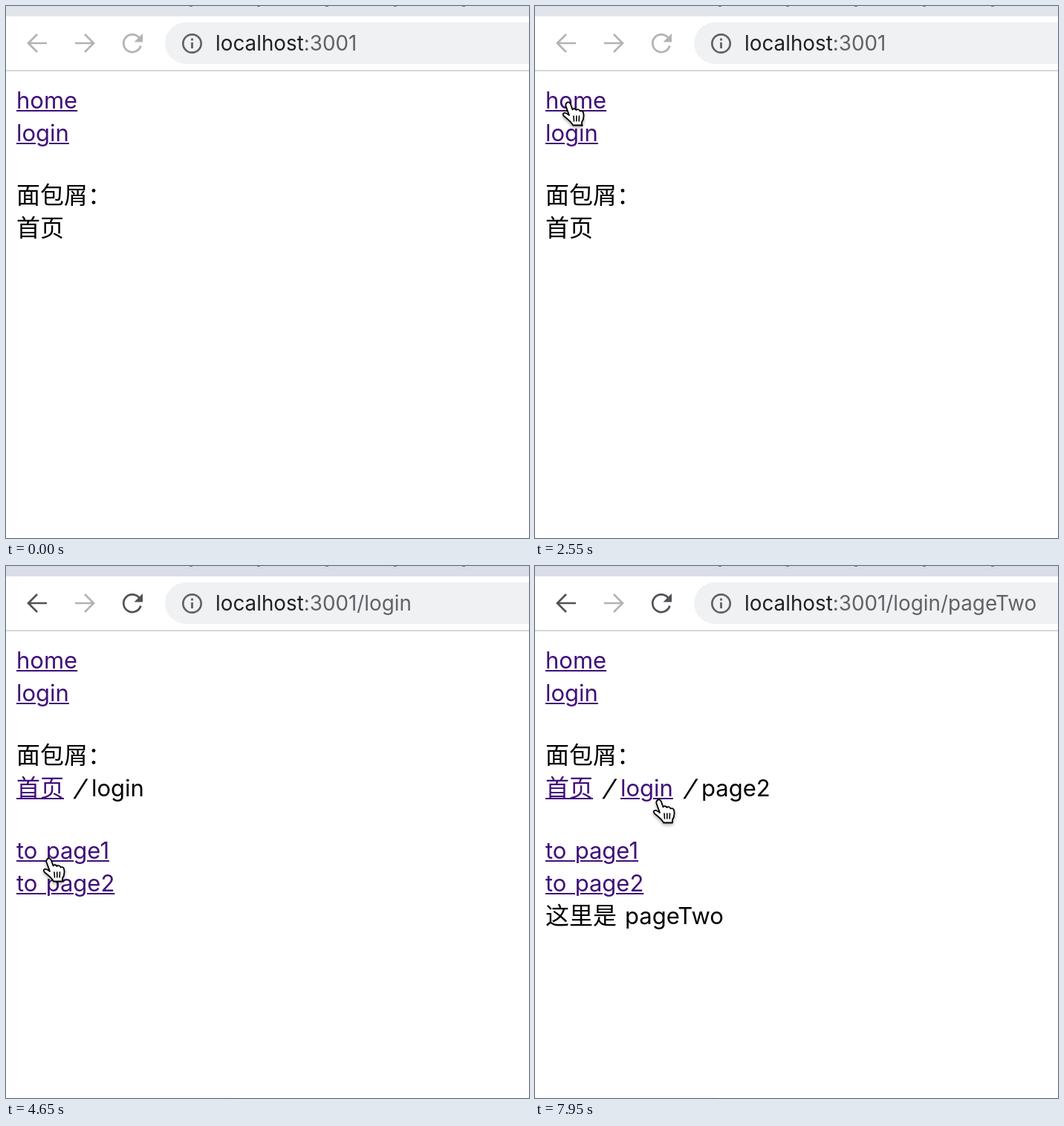
Animation, 704 px wide and 716 px high, one loop 8000 ms. Source, as an HTML page:

```html
<!DOCTYPE html>
<html lang="zh-CN">
<head>
<meta charset="utf-8">
<style>
  html, body { margin: 0; width: 100%; height: 100%; overflow: hidden; background: #fff; }
  body { position: relative; font-family: Inter, "Noto Sans CJK SC", "Noto Sans CJK", sans-serif; }
  svg { position: absolute; left: 0; top: 0; }
  span { position: absolute; white-space: pre; line-height: 44px; font-size: 31px; word-spacing: 2.5px; color: #000; }
  .link { color: #40107a; text-decoration: underline 2px; text-underline-offset: 2px; }
  .cjk { font-size: 32px; font-weight: 500; }
  .url { font-size: 27.8px; color: #5f6368; }
  .host { color: #202124; font-weight: 400; }
  .slash { font-weight: 500; transform: skewX(-20deg); transform-origin: 0 33px; }
  #bubble { position: absolute; left: 0; top: 717px; height: 20px; box-shadow: 0 0 6px rgba(0, 0, 0, .07); }
  #pointer { z-index: 1; filter: drop-shadow(0 2px 2px rgba(0, 0, 0, .35)); }
</style>
</head>
<body>
<svg width="704" height="716" viewBox="0 0 704 716" fill="none">
  <rect id="tabs" width="704" height="14"/>
  <path d="M247 .5h4M338 .5h4M430 .5h4M522 .5h4M614 .5h4" stroke="#777b80"/>
  <rect x="214" y="22" width="540" height="56" rx="28" fill="#eff1f3"/>
  <path d="M0 87H704" stroke="#d6d8da" stroke-width="2"/>
  <g stroke-width="2.7">
    <path id="back" d="M55 50H30M42 38L30 50L42 62"/>
    <path d="M93 50H118M106 38L118 50L106 62" stroke="#b1b3b5"/>
    <path id="reload" d="M179 42.5A11.8 11.8 0 1 0 181.4 53.5"/>
    <path id="tip" d="M184 37v11.5h-11.5z"/>
  </g>
  <circle cx="250.5" cy="50.5" r="12.2" stroke="#5f6368" stroke-width="2.7"/>
  <path d="M250.5 43.5v3M250.5 49v8" stroke="#5f6368" stroke-width="2.8"/>
</svg>
<div id="bubble"></div>
<svg id="pointer" width="704" height="716" viewBox="0 0 704 716">
  <path id="arrow" d="M0 1V25L5.5 20L9.7 30L13.7 28.3L9.5 18.5H17Z" stroke="#fff" stroke-width="3" paint-order="stroke"/>
  <g id="hand" stroke="#000" stroke-width="1.8" stroke-linejoin="round" stroke-linecap="round">
    <path fill="#fff" d="M-1.5 .5C.5-1.5 3-.5 4 2.5L6.5 9.5C7.5 7.5 10.5 8 11.5 10C13 8.5 15.5 9 16.5 11.5C18.5 10.5 21 11.5 21.2 14.5C22 18.5 21.5 22.5 19 26.5V30.5H7C6 27.5 1.5 23.5-3.5 19.5C-6.5 17.5-7 15-5 14C-2.5 13.3 0 15.5 2 17L-2.5 4.5C-3 2.5-2.5 1.5-1.5 .5Z"/>
    <path d="M8 18l.5 7M11.8 18v7M15.5 18l-.3 7" stroke-width="1.6"/>
  </g>
</svg>
<script>
const LOOP = 8000, FOCUS = 2600, LOGIN = 3600, PAGE = 5450, TWO = 7000;
const $ = id => document.getElementById(id);
const items = [];

function put(x, baseline, text, cls = '', from = 0, to = LOOP, bubble = 0) {
  const el = document.createElement('span');
  el.textContent = text;
  el.className = cls;
  el.style.left = x + 'px';
  el.style.top = baseline - (cls === 'url' ? 32 : 33) + 'px';
  document.body.append(el);
  items.push({ el, x, baseline, from, to, bubble, link: cls.includes('link') });
  return el;
}

function address(path, from, to) {
  const host = document.createElement('b');
  host.className = 'host';
  host.textContent = 'localhost';
  put(282, 60, ':3001' + path, 'url', from, to).prepend(host);
}
address('', 0, LOGIN);
address('/login', LOGIN, PAGE);
address('/login/page', PAGE, TWO);
address('/login/pageTwo', TWO);

put(14, 138, 'home', 'link', 0, LOOP, 190);
put(14, 182, 'login', 'link', 0, LOOP, 245);
put(14, 266, '面包屑：', 'cjk');
put(14, 310, '首页', 'cjk', 0, LOGIN);
put(14, 310, '首页', 'cjk link', LOGIN, LOOP, 190);
put(91, 310, '/', 'slash', LOGIN);
put(115, 310, 'login', '', LOGIN, PAGE);
put(115, 310, 'login', 'link', PAGE, LOOP, 245);
put(200, 310, '/', 'slash', PAGE);
put(224, 310, 'page', '', PAGE, TWO);
put(224, 310, 'page2', '', TWO);
put(14, 394, 'to page1', 'link', LOGIN, LOOP, 305);
put(14, 438, 'to page2', 'link', LOGIN, LOOP, 355);
put(14, 482, 'This is page', '', PAGE, TWO);
put(14, 482, '这里是', 'cjk', TWO);
put(121, 482, 'pageTwo', '', TWO);

// pointer hot spot: time, x, y
const path = [
  [850, 712, 712], [1300, 330, 318], [1750, 78, 188], [2150, 44, 130], [2650, 44, 130],
  [3050, 34.5, 169], [3800, 34.5, 169], [4500, 57, 394], [5700, 57, 394], [6300, 66, 405],
  [6600, 66, 405], [6900, 92, 432], [7500, 92, 432], [7750, 120, 402], [7950, 166, 315], [8000, 166, 315]
];
const speed = (i, k) => path[i + 1] ? (path[i + 1][k] - path[i][k]) / (path[i + 1][0] - path[i][0]) : 0;
// harmonic mean of neighbouring speeds: smooth, without overshoot at rests
function tangent(i, k) {
  if (!i) return speed(0, k);
  const a = speed(i - 1, k), b = speed(i, k);
  return a * b > 0 ? 2 * a * b / (a + b) : 0;
}
function along(t, k) {
  const i = Math.max(0, path.findIndex(p => p[0] > t) - 1);
  const p = path[i], q = path[i + 1], d = q[0] - p[0];
  const u = Math.max(0, (t - p[0]) / d), v = 1 - u;
  return v * v * (1 + 2 * u) * p[k] + u * u * (3 - 2 * u) * q[k]
    + d * u * v * (v * tangent(i, k) - u * tangent(i + 1, k));
}

function draw(now) {
  const t = Math.floor(now % LOOP / 50) * 50;
  const active = t >= FOCUS, ink = active ? '#505356' : '#b1b3b5';
  $('tabs').setAttribute('fill', active ? '#dadde5' : '#e1e5e9');
  $('back').setAttribute('stroke', ink);
  $('reload').setAttribute('stroke', ink);
  $('tip').setAttribute('fill', ink);

  const x = along(t, 1), y = along(t, 2);
  let hover = null;
  for (const item of items) {
    const shown = t >= item.from && t < item.to;
    item.el.style.visibility = shown ? 'visible' : 'hidden';
    if (shown && item.link && x >= item.x && x <= item.x + item.el.offsetWidth
      && y >= item.baseline - 34 && y <= item.baseline + 5.5) hover = item;
  }
  for (const id of ['arrow', 'hand']) {
    $(id).setAttribute('transform', `translate(${x} ${y})`);
    $(id).style.display = (id === 'hand') === !!hover ? '' : 'none';
  }
  $('bubble').style.display = hover && active ? '' : 'none';
  if (hover) $('bubble').style.width = hover.bubble + 'px';
}
const start = performance.now();
function tick() {
  draw(performance.now() - start);
  requestAnimationFrame(tick);
}
tick();
</script>
</body>
</html>
```
